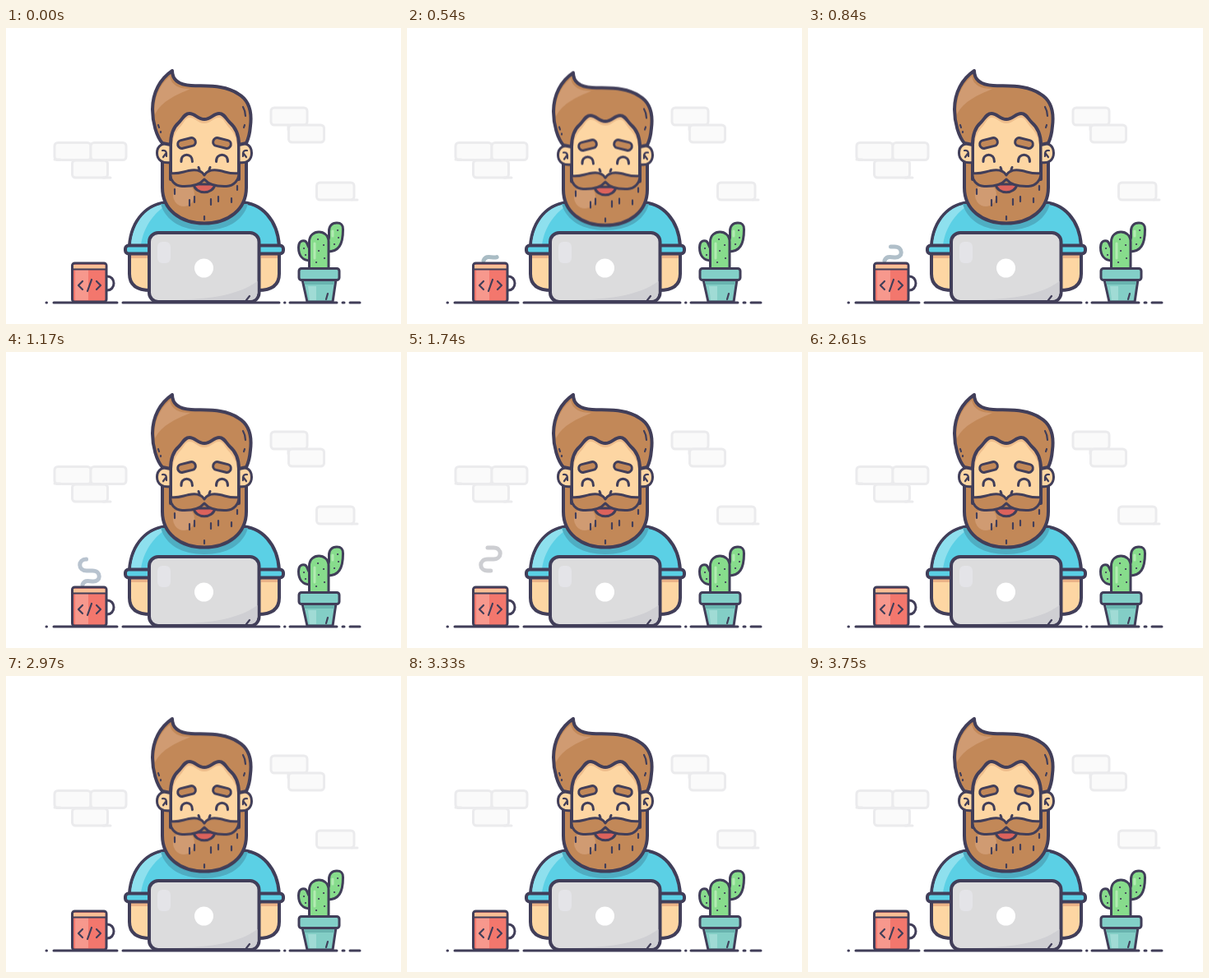
Write an HTML page that moves like this. It is 480x360 px and loops after 3780 ms.

```html
<!DOCTYPE html>
<html lang="en">
<head>
<meta charset="utf-8">
<title>Cheerful coder</title>
<style>
  html, body { margin: 0; width: 100%; height: 100%; overflow: hidden; background: #fff; }
  svg { display: block; width: 480px; height: 360px; }
  .ink { stroke: #413e59; stroke-width: 4; stroke-linecap: round; stroke-linejoin: round; }
  .thin { stroke-width: 3; }
  .fine { stroke-width: 2.2; }
  .line { fill: none; }
  .flat { stroke: none; }
  .skin { fill: #fdd6a3; }
  .hair { fill: #c28858; }
  .glow { fill: #d09b72; }
  .shirt { fill: #5bd0e5; }
  .green { fill: #87dc8c; }
  .brick { fill: #fafafa; stroke: #ebebed; stroke-width: 3; stroke-linecap: round; }

  .head { animation: nod 756ms ease-in-out infinite; }
  .mouth { animation: chew 756ms ease-in-out infinite; }
  .steam {
    fill: none; stroke-width: 5; stroke-linecap: round;
    animation: rise 3780ms linear infinite;
  }
  @keyframes nod {
    0%, 54%, 96%, 100% { transform: translateY(0); }
    75% { transform: translateY(2.6px); }
  }
  @keyframes chew {
    0%, 54%, 96%, 100% { transform: translateY(0); }
    75% { transform: translateY(.9px); }
  }
  @keyframes rise {
    0%, 9.99% { stroke-dasharray: 0 200; stroke-dashoffset: 0; stroke: #a9bcc4; opacity: 0; }
    10% { stroke-dasharray: 0 200; stroke-dashoffset: 0; opacity: 1; }
    14.3% { stroke-dasharray: 17 200; stroke-dashoffset: 0; stroke: #a9bcc4; }
    31% { stroke-dasharray: 64 200; stroke-dashoffset: 0; stroke: #b8c3cf; }
    46% { stroke-dasharray: 62 200; stroke-dashoffset: -38; stroke: #cdced2; opacity: 1; }
    62% { stroke-dasharray: 2 200; stroke-dashoffset: -98; stroke: #e2e2e5; opacity: 1; }
    63%, 100% { stroke-dasharray: 0 200; stroke-dashoffset: -100; stroke: #e2e2e5; opacity: 0; }
  }
</style>
</head>
<body>
<svg viewBox="0 0 480 360">
  <g class="brick">
    <rect x="59" y="139.500" width="44" height="21" rx="4"/>
    <rect x="103" y="139.500" width="43" height="21" rx="4"/>
    <rect x="80.500" y="161" width="43" height="21" rx="4"/>
    <rect x="322" y="97" width="44" height="21" rx="4"/>
    <rect x="343.500" y="118" width="43" height="21" rx="4"/>
    <rect x="377.500" y="188" width="45.500" height="21" rx="4"/>
    <path d="M118 182H127M420 209H427M343 118V124M59 160H66"/>
  </g>

  <path class="steam" pathLength="100" d="M93 283C95 278 98 278 105 279C116 280 116 266 105 266H98C87 266 87 252 98 252H105C116 252 116 238 105 238H98"/>

  <!-- body -->
  <g class="ink">
    <path class="skin" d="M150 272V299C150 313 160 319 176 319V272ZM332 272V299C332 313 322 319 306 319V272Z"/>
    <path class="flat" fill="#ebb287" d="M152 276H172V280H152ZM310 276H330V280H310Z"/>
    <path class="shirt" d="M150 265C152 234 172 212 199 212H284C311 212 330 234 332 265L308 275H174Z"/>
    <path class="flat" fill="#8ee0ee" d="M152 264C154 236 172 214 197 214C180 224 167 242 164 264Z"/>
    <path class="flat" fill="#4fadc2" d="M188 214H294C288 235 268 246 241 246S194 235 188 214Z"/>
    <rect class="shirt" x="145" y="264.500" width="32" height="10" rx="4"/>
    <rect class="shirt" x="305" y="264.500" width="32" height="10" rx="4"/>
  </g>

  <g class="head">
    <path class="ink hair" d="M190 138V194C190 221 212 237.500 241 237.500S292 221 292 194V138Z"/>
    <ellipse class="glow" cx="216" cy="203" rx="13" ry="14"/>
    <path class="ink skin" d="M200 184V130L212 102H270L283 130V184Z"/>
    <path class="flat" fill="#eebd8b" d="M202 146C202 134 206 126 212 120C217 114 218 109 223 109C230 109 233 116 241 116S252 109 259 109C264 109 265 114 270 120C276 126 281 134 281 146V120L262 100H220L202 120Z"/>
    <g class="ink thin skin">
      <path d="M200 140.500C191 139 183.500 143 183.500 152S191 165 200 163.500Z"/>
      <path d="M283 140.500C292 139 298.500 143 298.500 152S292 165 283 163.500Z"/>
      <path class="line fine" d="M190 149Q196 148 195 156M191 157L194 153M293 149Q287 148 288 156M292 157L289 153"/>
    </g>
    <path class="ink hair" d="M190 140C183 132 178 115 178 99C178 79 187 62 202 52C202 62 208 69 225 70C246 71 266 69 282 80C296 88 299 103 297 119Q296 132 292 140L283 142C283 130 279 121 272 115C267 110 265 104 259 104C252 104 249 111 241 111S230 104 223 104C217 104 215 110 210 115C203 121 200 130 200 142Z"/>
    <path class="glow" d="M181 105C179 85 187 69 199 59C201 70 211 74 224 74C206 82 190 88 181 105Z"/>
    <path class="ink line fine" d="M185 118L186 121M188 126V127M288 96Q291 101 291 107M290 118L289 121"/>
    <g class="ink thin hair">
      <rect x="208.500" y="135" width="22" height="10" rx="5" transform="rotate(-14 219.500 140)"/>
      <rect x="251.500" y="135" width="22" height="10" rx="5" transform="rotate(14 262.500 140)"/>
    </g>
    <path class="ink thin line" d="M213 162.500C212 151.500 227 151.500 226.500 162.500M255.500 162.500C255 151.500 270 151.500 269.500 162.500M234 169.500L235 172M248 169.500L247 172"/>
    <path class="ink line fine" d="M205 196V202M223 209V216M229 205V212M241 229V233M249 208V215M258 205V211M274 207V212M281 192V197"/>
    <g class="ink thin mouth">
      <path fill="#dc625c" d="M228 190H254C252 203 230 203 228 190Z"/>
      <path class="hair" d="M241 179C237 172 229 172 222 173.500C213 175.500 208 178 200 176.500C199 185 205 192 214 192.500C226 193 236 190 241 184C246 190 256 193 268 192.500C277 192 283 185 283 176.500C274 178 269 175.500 260 173.500C253 172 245 172 241 179Z"/>
    </g>
  </g>

  <!-- laptop -->
  <rect class="ink" x="174" y="249" width="133.500" height="84" rx="11" fill="#dcdcdd"/>
  <path fill="#cfcfd3" d="M190 331C245 331 283 325 305.500 308V322Q305 331 296 331Z"/>
  <rect x="184" y="260" width="16" height="26" rx="6" fill="#e4e4e8"/>
  <circle cx="240.500" cy="292" r="11.500" fill="#fff"/>
  <path class="ink line fine" d="M296 326L292 331"/>

  <!-- mug -->
  <path class="ink thin line" d="M122 302C134 301 134 320 122 319"/>
  <rect class="ink thin" x="80.500" y="286" width="41.500" height="47" rx="3" fill="#f3776d"/>
  <path fill="#f7988d" d="M84 294H100V331H84Z"/>
  <path fill="#f8bf95" d="M82 288H120.500V293H82Z"/>
  <path class="ink line fine" d="M81 293.500H121M93 308L88 313L93 318M104 306L99 320M110 308L115 313L110 318"/>

  <!-- cactus -->
  <g class="ink thin">
    <path class="green" d="M370 283C360 283 355.500 276 355.500 267C355.500 260 359 258 363 259C367 260 366 267 370 269ZM391 272C404 272 409.500 264 409.500 245C409.500 239 407 237 402 237C396 237 392.500 241 392.500 247V255Q392 258 391 258Z"/>
    <path class="green" d="M368.500 293V260C368.500 244 392 244 392 260V293Z"/>
    <path stroke="#b2ebb2" class="line" d="M375 262V280M397 247V253"/>
    <path class="line fine" d="M379 257h.1M386 264h.1M380 271h.1M387 280h.1M377 285h.1M362 268h.1M364 276h.1M403 246h.1M404 255h.1M399 263h.1"/>
    <path fill="#83cec6" d="M360 306H401L397 333H366Z"/>
    <path class="flat" fill="#a0dbd5" d="M367 314H377V331H369Z"/>
    <path class="flat" fill="#69b4af" d="M362.500 308H399L398.500 312H363Z"/>
    <rect x="356" y="292.500" width="49" height="14" rx="3" fill="#83cfc8"/>
    <path class="line fine" d="M391 323L389 330"/>
  </g>

  <path class="ink line thin" d="M49 334h.5M58 334H135M142 334H332M338.500 334h.5M345 334H402M409 334H411M418 334H430"/>
</svg>
</body>
</html>
```
